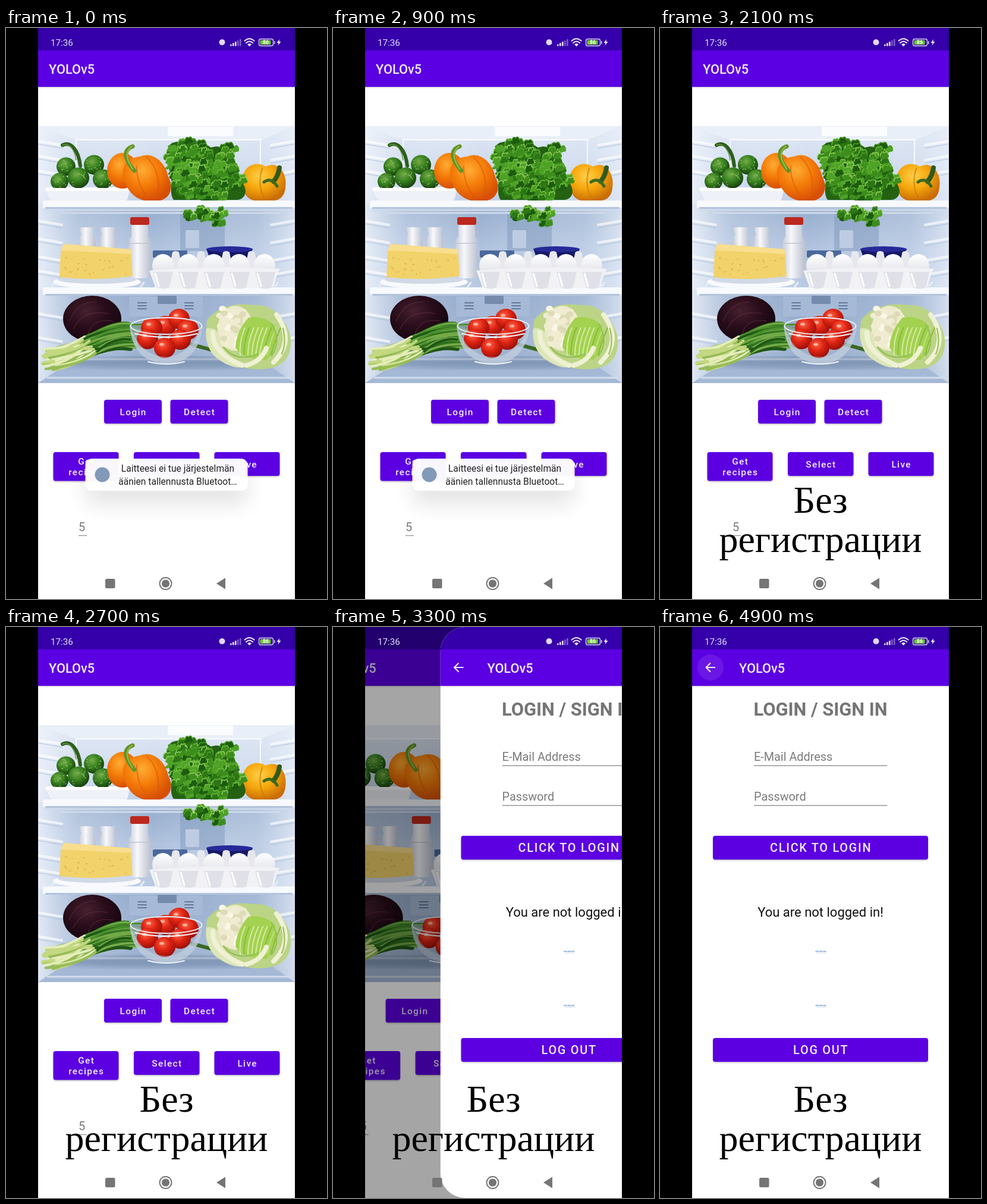
An HTML page for the animation above (5 s loop, 540x960 px).

```html
<!DOCTYPE html>
<html lang="en">
<head>
<meta charset="utf-8">
<title>Fridge detector</title>
<style>
  html, body { margin: 0; width: 100%; height: 100%; overflow: hidden; background: #000; }
  svg { display: block; width: 100vw; height: 100vh; }
  text { font-family: Roboto, sans-serif; white-space: pre; }
  .title { font-size: 21.7px; font-weight: 500; fill: #fff; fill-opacity: .93; }
  .btn { font-size: 15.4px; font-weight: 500; letter-spacing: 1.38px; fill: #fff; fill-opacity: .93; text-anchor: middle; }
  .big { font-size: 19.84px; letter-spacing: 1.77px; }
  .field { font-size: 19.84px; fill: #7b7b7b; }
  .toast { font-size: 15.6px; fill: #222; text-anchor: middle; }
  .caption { font: 64px "Liberation Serif", "Times New Roman", serif; text-anchor: middle; }
</style>
</head>
<body>
<svg id="stage" viewBox="0 0 540 960" xmlns="http://www.w3.org/2000/svg"></svg>
<script>
const LOOP = 5000, WIDTH = 432;
const PURPLE = '#5b00e2', DARK = '#3500aa';

let seed = 11;
const rnd = () => (seed = (seed * 16807) % 2147483647) / 2147483647;
const span = (a, b) => a + (b - a) * rnd();
const pick = list => list[Math.floor(rnd() * list.length)];
const times = (n, make) => Array.from({ length: n }, (_, i) => make(i)).join('');

const rect = (x, y, w, h, fill, more = '') =>
  `<rect x="${x}" y="${y}" width="${w}" height="${h}" fill="${fill}" ${more}/>`;
const oval = (x, y, rx, ry, fill, more = '') =>
  `<ellipse cx="${x}" cy="${y}" rx="${rx}" ry="${ry}" fill="${fill}" ${more}/>`;
const path = (d, fill, more = '') => `<path d="${d}" fill="${fill}" ${more}/>`;
const line = (d, color, w, more = '') =>
  `<path d="${d}" fill="none" stroke="${color}" stroke-width="${w}" stroke-linecap="round" ${more}/>`;
const text = (x, y, cls, s) => `<text x="${x}" y="${y}" class="${cls}">${s}</text>`;
const grad = (id, dir, ...stops) =>
  `<linearGradient id="${id}" ${dir === 'v' ? 'x2="0" y2="1"' : ''}>` +
  stops.map(([o, c, a = 1]) => `<stop offset="${o}" stop-color="${c}" stop-opacity="${a}"/>`).join('') +
  '</linearGradient>';
const ball = (id, ...c) =>
  `<radialGradient id="${id}" cx=".4" cy=".33" r=".68">` +
  c.map((k, i) => `<stop offset="${i / (c.length - 1)}" stop-color="${k}"/>`).join('') + '</radialGradient>';

const defs = `<defs>
  <clipPath id="screen"><rect x="54" width="432" height="960"/></clipPath>
  <clipPath id="photoBox"><rect x="54" y="165" width="432" height="432"/></clipPath>
  <clipPath id="pageBox"><rect id="pageShape" x="54" width="600" height="960"/></clipPath>
  <filter id="lift" x="-10%" y="-20%" width="120%" height="150%">
    <feDropShadow dx="0" dy="1.5" stdDeviation="1.1" flood-opacity=".26"/></filter>
  <filter id="float" x="-30%" y="-60%" width="160%" height="320%">
    <feDropShadow dx="0" dy="24" stdDeviation="18" flood-opacity=".11"/></filter>
  <filter id="soft"><feGaussianBlur stdDeviation="5"/></filter>
  ${grad('barShade', 'v', [0, '#000', .16], [1, '#000', 0])}
  ${grad('top', 'v', [0, '#e1e8f4'], [.55, '#cbd8ec'], [1, '#bccce5'])}
  ${grad('mid', 'v', [0, '#93aacb'], [.5, '#afc2de'], [1, '#b9cae2'])}
  ${grad('low', 'v', [0, '#8ca4c8'], [.6, '#9ab0d0'], [1, '#829cc2'])}
  ${grad('sides', 'h', [0, '#f0f4fb', .85], [.16, '#dfe8f5', .35], [.45, '#fff', 0], [.85, '#dfe8f5', .3], [1, '#eaf0f9', .75])}
  ${grad('milk', 'h', [0, '#c3c8d5'], [.4, '#f8f8fb'], [1, '#b9bfce'])}
  ${grad('eggs', 'v', [0, '#fff'], [1, '#d9dbe3'])}
  ${ball('cuke', '#76ac48', '#37801f', '#163f0d')}
  ${ball('orange', '#ffad35', '#f47c08', '#d74e05')}
  ${ball('yellow', '#ffd04a', '#f6a80d', '#c96d05')}
  ${ball('tomato', '#ff6046', '#dc2412', '#9c0f09')}
  ${ball('beet', '#46202f', '#290d1a', '#14060f')}
</defs>`;

// Ruffled leaves: small dark folds with bright curled rims.
const leafy = (n, cx, cy, rx, ry) => times(n, () => {
  const a = span(0, 6.283), d = Math.sqrt(rnd()), r = span(4, 8);
  const x = (cx + Math.cos(a) * d * rx).toFixed(1), y = (cy + Math.sin(a) * d * ry).toFixed(1);
  const curl = `M${x} ${y}m${-r} 0q1 -8 ${r} -5q5 -4 ${r} 3`;
  return path(curl + `q3 6 -4 6q-7 4 ${-r - 4} -1z`, pick(['#1d5c10', '#2c7616', '#3d8d1d', '#4ea226'])) +
    line(curl, pick(['#4c9c26', '#6dba3a', '#8fce57']), 1.6);
});

const shelf = y => rect(62, y, 424, 13, '#f7f9fd', 'rx="3"') + rect(66, y + 11, 416, 3, '#b3c4dd');

function fridge() {
  const ribs = times(9, i => {
    const y = [190, 215, 240, 324, 354, 384, 408, 480, 520][i];
    return line(`M54 ${y}l40 7M486 ${y}l-40 7`, '#fff', 4, 'opacity=".65"') +
      line(`M54 ${y + 5}l40 7M486 ${y + 5}l-40 7`, '#a9bcd8', 1.5, 'opacity=".6"');
  });
  const room = rect(54, 165, 432, 130, 'url(#top)') + rect(54, 295, 432, 145, 'url(#mid)') +
    rect(54, 440, 432, 157, 'url(#low)') + rect(54, 165, 432, 432, 'url(#sides)') +
    path('M54 165H486L430 188H118z', '#e9eff8') + rect(272, 166, 110, 16, '#fff', 'opacity=".8"') +
    line('M118 188V288M428 188V288M118 188H430', '#fff', 2, 'opacity=".8"') + ribs +
    rect(293, 307, 75, 68, '#8299bd', 'opacity=".5" rx="3"') + rect(302, 340, 23, 30, '#bdcce2', 'rx="2"') +
    rect(207, 451, 124, 34, '#a6bad7', 'rx="3"') + rect(255, 450, 32, 14, '#758bae', 'rx="2"') +
    times(3, i => line(`M222 ${462 + i * 5}h14M301 ${462 + i * 5}h14`, '#647a9c', 2)) +
    path('M54 597L118 555H424L486 597z', '#a5b9d6') + line('M118 557H424M70 588H478', '#d3deed', 3);

  const stems = line('M95 197C109 190 122 205 125 232', '#2d5e1c', 6) +
    line('M95 197C106 192 116 205 118 222', '#5f963d', 1.5);
  const cucumbers = stems + [[101, 233, 16], [148, 230, 17], [163, 254, 17], [90, 258, 15], [122, 252, 18]]
    .map(([x, y, r]) => oval(x, y, r, r - .5, 'url(#cuke)') +
      times(12, () => oval(x + span(-.7, .7) * r, y + span(-.7, .7) * r, 1.2, 1, '#9bc873', 'opacity=".7"'))).join('');
  const peppers = oval(196, 240, 26, 30, 'url(#orange)') +
    path('M197 250C194 221 217 217 226 216C246 207 268 225 273 250C284 270 275 293 248 291C222 293 204 278 197 250z', 'url(#orange)') +
    line('M236 217C254 231 261 262 253 286M220 232C219 252 227 273 240 287', '#d9580a', 2, 'opacity=".6"') +
    line('M216 240C205 228 192 207 213 199', '#5f9426', 7) + line('M213 237C205 224 197 210 212 199', '#9abc4c', 2) +
    path('M398 257C398 228 424 224 437 233C456 223 474 242 470 268C468 292 450 292 433 290C409 294 398 282 398 257z', 'url(#yellow)') +
    line('M431 236C424 256 428 276 436 287', '#c87808', 2.5, 'opacity=".6"') +
    line('M450 258Q458 249 460 235', '#31591b', 8) + line('M434 259Q446 250 456 266', '#3d6a22', 5);
  const lettuce = path('M280 193C307 186 330 190 345 201C366 194 371 210 378 219C392 227 386 241 397 259C409 276 401 289 388 289H282C273 276 282 258 276 246C271 222 281 207 272 199z', '#246212') +
    leafy(80, 307, 222, 39, 34) + leafy(115, 338, 258, 62, 31) + leafy(26, 370, 222, 22, 26);
  const dangling = leafy(22, 331, 312, 38, 9) + leafy(8, 356, 322, 12, 9);
  const topShelf = path('M66 270H209L204 289Q200 292 190 292H86Q76 292 73 286z', '#eef1f7') +
    rect(66, 268, 144, 6, '#fff', 'rx="3"') + cucumbers + rect(74, 269, 130, 5, '#fff') + peppers + lettuce +
    line('M66 306H480M90 311H460', '#cfdbec', 3) + shelf(290) + dangling;

  const jar = x => path(`M${x + 2} 335h24v6l-2 6q5 5 5 22h-29q0 -17 5 -22l-3 -6z`, 'url(#milk)');
  const bottle = path('M211 328H239V350Q245 358 244 375V416Q242 421 225 421Q207 421 205 416V375Q205 358 211 350z', 'url(#milk)') +
    rect(209, 318, 32, 13, '#bb281e', 'rx="3"') + line('M206 362H243', '#bfc5d2', 1.5);
  const cheese = oval(153, 427, 74, 11, '#f8f9fc') + oval(153, 423, 66, 7, '#d1d9e6') +
    path('M92 376L97 363L210 372L213 417Q152 426 90 419z', '#f2d26a') +
    path('M92 374L97 363L210 372L211 380z', '#f8de8e') +
    times(26, () => oval(span(96, 208), span(386, 415), span(.8, 2), 1.3, '#dbad42', 'opacity=".7"'));
  const carton = rect(247, 374, 58, 12, '#4a689c', 'rx="2"') +
    path('M337 371H415L407 394H345z', '#161866') + oval(376, 372, 39, 5, '#262a99') +
    times(4, i => path(`M${280 + i * 42.5} 377q5 -4 11 0l8 40h-27z`, '#e7e7ed')) +
    times(5, i => oval(264 + i * 42.7, 400, 18, 20, 'url(#eggs)')) +
    path('M241 408Q350 399 461 405L457 411L450 435Q350 442 252 437z', '#f2f2f5') +
    times(5, i => path(`M${247 + i * 43} 410h34l-6 26q-10 5 -21 0z`, '#e0e1e8') +
      line(`M${251 + i * 43} 413l6 21`, '#fff', 3));
  const midShelf = jar(122) + jar(157) + bottle + shelf(436) +
    times(16, i => line(`M${82 + i * 25} 428l-6 8`, '#e6edf7', 3)) + cheese + carton;

  const cabbage = oval(145, 489, 49, 39, 'url(#beet)') +
    line('M106 493Q121 459 151 461M113 506Q130 472 171 480M137 520Q143 486 180 493', '#663246', 1.4, 'opacity=".5"');
  const onions = times(42, i => {
    const y0 = span(538, 576), y1 = 496 + (i * 17 % 42) * 1.1;
    const x0 = span(60, 88), bend = span(122, 154);
    const c = pick(['#1f5715', '#2f6f1d', '#4a8f2c', '#74aa48']);
    return line(`M${bend} ${(y0 + y1) / 2 - 2}Q180 ${y1 - 4} ${span(205, 234)} ${y1}`, c, 4) +
      line(`M${x0} ${y0}Q${bend - 25} ${y0 - 5} ${bend} ${(y0 + y1) / 2 - 2}`, pick(['#c3d880', '#e5edba', '#95bb57']), 4);
  });
  const tomatoes = [[268, 501], [245, 504], [291, 489], [306, 507], [238, 523], [293, 524], [267, 538]]
    .map(([x, y]) => oval(x, y, 18, 17, 'url(#tomato)') + oval(x - 5, y - 6, 4, 2.5, '#ffc5b2', 'opacity=".8"')).join('');
  const bowl = path('M208 500Q213 548 244 559Q270 570 297 559Q326 544 331 500z', '#a3b3c9', 'opacity=".7"') + tomatoes +
    path('M208 502Q213 548 244 559Q270 570 297 559Q326 544 331 502L318 525Q295 553 270 553Q239 553 220 525z', '#dde6f0', 'opacity=".4"') +
    `<ellipse cx="269.5" cy="501" rx="60" ry="14" fill="none" stroke="#e8eff7" stroke-width="2"/>` +
    line('M239 561Q270 569 300 561M217 514Q270 526 322 514', '#eef4fa', 2);
  const cauliflower =
    path('M338 492C354 468 389 461 416 466C445 464 460 480 472 501C486 527 479 557 460 566C443 577 407 575 390 568C360 562 338 545 336 517z', '#bcd486') +
    oval(386, 505, 30, 38, '#ece9cd') +
    times(55, () => oval(384 + span(-25, 25), 503 + span(-31, 31), 6, 5, pick(['#faf7e6', '#f0ecd2', '#dfdbb8']))) +
    path('M408 487Q432 482 452 500Q461 533 438 558Q398 557 386 537Q388 508 408 487z', '#a3d150') +
    times(9, i => line(`M${394 + i * 6.5} 550q${i - 2} -24 ${8 + i} -46`, pick(['#d3eba0', '#bfe07c', '#83bd38']), 2)) +
    path('M337 505Q360 502 361 530Q372 558 411 566Q386 580 352 553Q334 535 337 505z', '#dde6b8') +
    line('M455 482Q487 526 450 562M438 538Q430 560 405 567M348 512Q346 545 397 567', '#eff1d4', 8) +
    line('M447 498Q464 525 447 551M466 505Q472 530 464 548M366 537Q388 563 424 548', '#93bd56', 2);
  const drawer = oval(270, 563, 180, 10, '#4d6588', 'opacity=".4" filter="url(#soft)"') +
    line('M308 531L345 541', '#3a6922', 6) + cabbage + onions + bowl + cauliflower;

  return `<g clip-path="url(#photoBox)">${room}${topShelf}${midShelf}${drawer}</g>`;
}

const button = (x, y, w, h, cls, ...rows) =>
  rect(x, y, w, h, PURPLE, 'rx="4" filter="url(#lift)"') +
  rows.map((s, i) => text(x + w / 2 + .7, y + h / 2 + (cls ? 7 : 6) + (i - (rows.length - 1) / 2) * 18, 'btn ' + cls, s)).join('');

const page = (titleX, body) => rect(54, 0, 620, 960, '#fff') + rect(54, 99, 620, 3, 'url(#barShade)') +
  rect(54, 0, 620, 38, DARK) + rect(54, 37.5, 620, 61.5, PURPLE) + text(titleX, 77, 'title', 'YOLOv5') + body;

const home = page(72, fridge() +
  button(165, 625, 97, 40, '', 'Login') + button(276.5, 625, 97, 40, '', 'Detect') +
  button(79.5, 713, 110, 48.5, '', 'Get', 'recipes') + button(215, 713, 110.5, 40, '', 'Select') +
  button(350.5, 713, 110, 40, '', 'Live') +
  text(122, 846, 'field', '5') + rect(122, 853, 14, 1, '#808080'));

const dashes = y => times(3, i => rect(261.5 + i * 6.3, y, 5.6, 1.6, '#83a8d8')) +
  rect(263, y + 2.2, 17, 2, '#dfe6ef');

const login = page(133,
  `<circle id="ripple" cx="85" cy="68" r="22" fill="#fff"/>` +
  line('M93 68H78M85 60.5L77.5 68L85 75.5', '#f3ecff', 2, 'style="stroke-linecap:butt"') +
  `<text x="270" y="149" text-anchor="middle" font-size="30.86" font-weight="700" fill="#757575">LOGIN / SIGN IN</text>` +
  text(158, 225, 'field', 'E-Mail Address') + rect(158, 232.5, 224, 1.2, '#7d7d7d') +
  text(158, 292, 'field', 'Password') + rect(158, 299.5, 224, 1.2, '#7d7d7d') +
  button(89, 351, 362, 40, 'big', 'CLICK TO LOGIN') +
  `<text x="270" y="487" text-anchor="middle" font-size="22" fill="#111">You are not logged in!</text>` +
  dashes(544.5) + dashes(635.5) + button(89, 691, 362, 40, 'big', 'LOG OUT'));

const toast = rect(133.5, 724, 273, 54, '#fff', 'rx="11" opacity=".965" filter="url(#float)"') +
  oval(162, 751, 12.5, 12.5, '#8299b9') +
  text(289, 746, 'toast', 'Laitteesi ei tue järjestelmän') + text(289, 768, 'toast', 'äänien tallennusta Bluetoot…');

const chrome = `<text x="75" y="30" font-size="15.2" fill="#e6dcf8">17:36</text>` +
  oval(363.5, 24, 5, 5, '#e2d8f5') +
  times(5, i => rect(377 + i * 4, 27.5 - i * 2.2, 2.6, 2.8 + i * 2.2, '#e8dffa', `opacity="${i < 3 ? 1 : .4}"`)) +
  line('M401.5 21.5Q409.5 14.5 417.5 21.5M404 25Q409.5 20 415 25', '#eee6fc', 2.1) +
  path('M406 27.5Q409.5 24.5 413 27.5L409.5 31z', '#eee6fc') +
  rect(425.5, 18.5, 24, 11.5, 'none', 'rx="3" stroke="#d9d0ea" stroke-width="1.4"') +
  rect(427.5, 20.5, 18, 7.5, '#69c92e', 'rx="1"') + rect(451, 22, 1.5, 5, '#d9d0ea') +
  `<text x="437" y="27.4" text-anchor="middle" font-size="8.5" font-weight="700" fill="#fff">86</text>` +
  path('M460 19L455.5 25H458.5L457.5 29.5L462.5 23H459.5z', '#f2ebff') +
  rect(167, 926, 16.5, 16, '#757575', 'rx="2.5"') +
  `<circle cx="268.5" cy="934" r="10" fill="none" stroke="#757575" stroke-width="1.9"/>` +
  oval(268.5, 934, 6.6, 6.6, '#757575') + path('M354 934L369 924.5V943.5z', '#757575');

const $ = id => document.getElementById(id);
$('stage').innerHTML = defs + rect(0, 0, 540, 960, '#000') +
  `<g clip-path="url(#screen)">
    <g id="home">${home}</g>
    <rect id="dim" x="54" width="432" height="960" fill="#000"/>
    <g id="login"><g clip-path="url(#pageBox)">${login}</g></g>
    <g id="toast">${toast}</g>${chrome}
  </g>
  <g id="caption">${text(270, 815, 'caption', 'Без')}${text(270, 881, 'caption', 'регистрации')}</g>`;

const clamp = v => Math.max(0, Math.min(1, v));
const ramp = (t, a, b) => clamp((t - a) / (b - a));

// Critically damped spring that settles before 3700 ms.
function slide(t) {
  const x = Math.max(0, t - 3135) * .0149;
  return t > 3690 ? 1 : 1 - Math.exp(-x) * (1 + x);
}

function draw(t) {
  const p = slide(t);
  $('home').setAttribute('transform', `translate(${-WIDTH / 4 * p})`);
  $('dim').setAttribute('opacity', .5 * p);
  $('login').setAttribute('transform', `translate(${WIDTH * (1 - p)})`);
  $('pageShape').setAttribute('rx', p < 1 ? 42 : 0);
  $('toast').setAttribute('opacity', 1 - ramp(t, 1800, 2000));
  $('caption').setAttribute('visibility', t >= 1600 ? 'visible' : 'hidden');
  $('ripple').setAttribute('opacity', .09 * ramp(t, 4700, 4900));
  $('ripple').setAttribute('r', 14 + 8 * ramp(t, 4700, 4800));
}

const start = performance.now();
function tick() {
  draw((performance.now() - start) % LOOP);
  requestAnimationFrame(tick);
}
tick();
</script>
</body>
</html>
```
